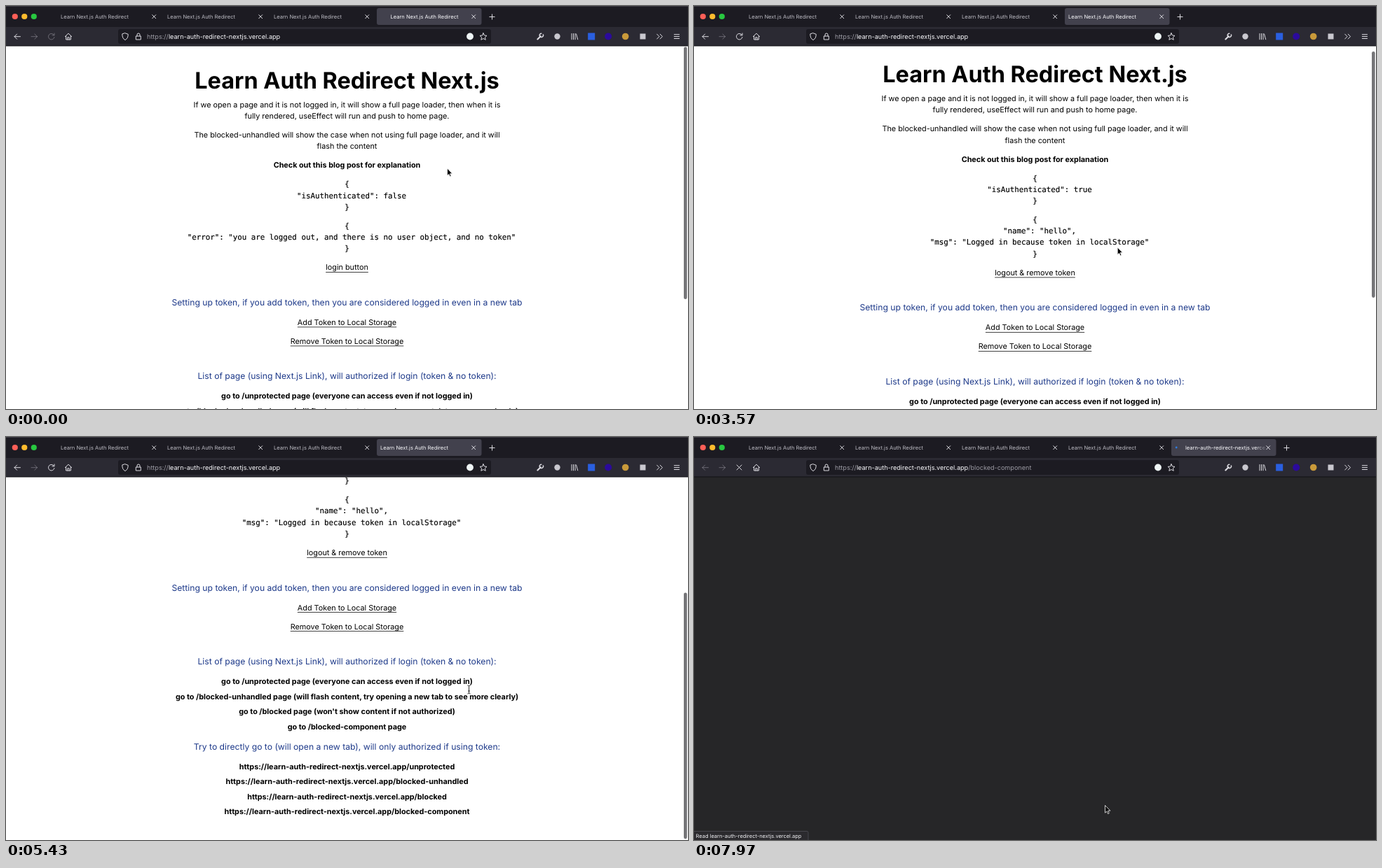
Write an HTML page that moves like this. It is 973 px wide and 576 px high and loops after 8 s.

```html
<!DOCTYPE html>
<html lang="en">
<head>
<meta charset="utf-8">
<title>Auth redirect demo</title>
<style>
  html, body { margin: 0; width: 100%; height: 100%; overflow: hidden; background: #fff; }
  svg { display: block; width: 973px; height: 576px; font-family: Inter, sans-serif; text-rendering: geometricPrecision; }
  text { white-space: pre; }
  .mid { text-anchor: middle; }
  .h1 { font-size: 48px; font-weight: 700; }
  .p, .link { font-size: 16px; }
  .b { font-size: 16px; font-weight: 700; }
  .h2 { font-size: 18px; fill: #1e3a8a; }
  .code { font: 16px "DejaVu Sans Mono", monospace; stroke: #000; stroke-width: .25; }
  .tab { font-size: 7.5px; fill: #bdbcc4; }
  .url { font-size: 9.1px; fill: #fbfbfe; }
  .status { font-size: 7.47px; fill: #f0f0f4; }
  .dim { fill: #9b9aa3; }
  .icon { fill: none; stroke: #dcdbe1; stroke-width: 1; stroke-linecap: round; stroke-linejoin: round; }
</style>
</head>
<body>
<svg id="stage" viewBox="0 0 973 576">
  <defs>
    <linearGradient id="fade" gradientUnits="userSpaceOnUse" x1="801" x2="818" y1="0" y2="0">
      <stop stop-color="#fbfbfe"/><stop offset="1" stop-color="#fbfbfe" stop-opacity="0"/>
    </linearGradient>
  </defs>
  <rect width="973" height="576" fill="#fff"/>
  <g id="page"></g>
  <rect id="thumb" x="967" width="4.6" rx="2.3" fill="#757578"/>
  <rect id="blank" y="57" width="973" height="519" fill="#262628"/>
  <g id="chrome">
    <rect width="973" height="30.5" fill="#1c1b22"/>
    <rect y="30" width="973" height="27" fill="#2b2a33"/>
    <rect y="56.5" width="973" height="1" fill="#111015"/>
    <rect width="973" height=".8" fill="#45444c"/>
    <circle cx="12.8" cy="15" r="4.1" fill="#ff5f57"/>
    <circle cx="26.3" cy="15" r="4.1" fill="#febc2e"/>
    <circle cx="39.8" cy="15" r="4.1" fill="#28c840"/>
    <rect id="active" y="3" width="149.5" height="24" rx="3" fill="#42414d"/>
    <g id="tabs"></g>
    <path id="plus" class="icon" d="M-3.6 15.5h7.2M0 11.9v7.2"/>
    <circle id="spinner" cy="15" r="1.4" fill="#2f7de0"/>
    <rect x="160" y="33" width="532" height="21" rx="3" fill="#1c1b22"/>
    <g class="icon">
      <path id="back" d="M20.5 43.7H12M15.6 40.1L12 43.7L15.6 47.3"/>
      <path opacity=".35" d="M36 43.7H44.5M40.9 40.1L44.5 43.7L40.9 47.3"/>
      <path id="reload" d="M68.3 41.2A4.3 4.3 0 1 0 69 44.6M69 39V41.9H66"/>
      <path id="stop" d="M61 40L68 47M68 40L61 47"/>
      <path d="M84.4 43.6L89 39.2L93.6 43.6M85.6 42.6V48H92.4V42.6M87.8 48V44.8H90.2V48"/>
      <path d="M170 38.8L174.2 40.3C174.3 44.6 172.7 47.1 170 48.6C167.3 47.1 165.7 44.6 165.8 40.3Z"/>
      <path d="M185.7 43H192.3V48H185.7ZM187 43V41A2 2 0 0 1 191 41V43"/>
      <path d="M681 38.7L682.5 42L686 42.4L683.4 44.8L684.2 48.3L681 46.5L677.8 48.3L678.6 44.8L676 42.4L679.5 42Z"/>
      <path d="M758.4 47.4L762.6 43.2" stroke-width="2.1"/>
      <path d="M766.4 41A2.7 2.7 0 1 1 763.8 39.2" stroke-width="1.5"/>
      <path d="M807 39.5V47.8M809.5 39.5V47.8M812 39.5V47.8M813.6 40L815.7 47.8"/>
      <path d="M928.7 40.2L932 43.6L928.7 47M933.2 40.2L936.5 43.6L933.2 47"/>
      <path d="M953.3 40.7H960.5M953.3 43.6H960.5M953.3 46.5H960.5"/>
    </g>
    <circle cx="662" cy="43.5" r="4.9" fill="#eef5f5"/>
    <circle cx="786.5" cy="43.5" r="4.2" fill="#c9c8cf"/>
    <rect x="830.2" y="38.5" width="10" height="10" fill="#2a5fe0"/>
    <circle cx="859.2" cy="43.5" r="5" fill="#2b0a9c"/>
    <circle cx="883.7" cy="43.5" r="4.8" fill="#c99a3a"/>
    <rect x="904.5" y="39.5" width="8" height="8" fill="#c9c8cf"/>
    <text class="url" x="201" y="47.1"><tspan class="dim">https://</tspan>learn-auth-redirect-nextjs.vercel.app<tspan id="path" class="dim"></tspan></text>
  </g>
  <g id="status">
    <rect x="-2" y="563.5" height="15" rx="2" fill="#1c1b22" stroke="#55545c" stroke-width=".7"/>
    <text class="status" x="2.6" y="572.7"></text>
  </g>
  <g id="cursor" stroke-linejoin="round">
    <path id="arrow" d="M0 0V10.6L2.4 8.4L4 12L5.7 11.3L4.1 7.7H7.4Z" fill="#000" stroke="#fff" stroke-width=".8"/>
    <path id="hand" d="M-1 1Q-1 0 0 0T1 1V4.4Q4.6 4 6 5.8V8.6L4.8 12H-1.2L-4.2 7.6Q-4 6.2-2.6 6.6L-1 8Z" fill="#000" stroke="#fff" stroke-width=".8"/>
    <path id="beam" d="M-2-6Q0-6 0-4.6Q0-6 2-6M0-4.6V4.8M-2 6Q0 6 0 4.6Q0 6 2 6M-1.3 2H1.3" fill="none" stroke="#111" stroke-width=".9"/>
  </g>
</svg>
<script>
// The page is laid out 1440 units wide and scaled down to the stage.
const LOOP = 8000, SCALE = 973 / 1440, TOP = 57.3, MID = 720, LINE = 24;
const AUTH = 1920, NEW_TAB = 6900;
const $ = id => document.getElementById(id);

function el(tag, attrs, parent, text) {
  const node = document.createElementNS('http://www.w3.org/2000/svg', tag);
  for (const k in attrs) node.setAttribute(k, attrs[k]);
  if (text) node.textContent = text;
  return parent.appendChild(node);
}
const show = (node, on) => node.setAttribute('display', on ? 'inline' : 'none');
const move = (node, x, y, scale = 1) => node.setAttribute('transform', `translate(${x} ${y}) scale(${scale})`);

const page = $('page');
const intro = el('g', {}, page), guest = el('g', {}, page), user = el('g', {}, page), rest = el('g', {}, page);

// Baseline of each style, measured from the top of its line box.
const BASE = { h1: 41.5, h2: 20.5, p: 17.8, b: 17.8, link: 17.8, code: 17.5 };

function write(parent, cls, top, str, dx = 0) {
  const y = top + BASE[cls];
  const t = el('text', { class: 'mid ' + cls, x: MID + dx, y }, parent, str);
  if (cls === 'link') {
    const w = t.getComputedTextLength();
    el('rect', { x: MID - w / 2, y: y + 4, width: w, height: 1.1 }, parent);
  }
}
const list = (parent, cls, top, step, lines) =>
  lines.forEach((s, i) => write(parent, cls, top + i * step, s));
// Indented code lines sit one character right of centre.
const code = (parent, top, lines) =>
  lines.forEach((s, i) => write(parent, 'code', top + i * LINE, s, s.length > 1 ? 9.6 : 0));

write(intro, 'h1', 48, 'Learn Auth Redirect Next.js');
list(intro, 'p', 112, LINE, [
  'If we open a page and it is not logged in, it will show a full page loader, then when it is',
  'fully rendered, useEffect will run and push to home page.'
]);
list(intro, 'p', 176, LINE, [
  'The blocked-unhandled will show the case when not using full page loader, and it will',
  'flash the content'
]);
write(intro, 'b', 240, 'Check out this blog post for explanation');

code(guest, 280, ['{', '"isAuthenticated": false', '}']);
code(guest, 368, ['{', '"error": "you are logged out, and there is no user object, and no token"', '}']);
write(guest, 'link', 456, 'login button');

code(user, 280, ['{', '"isAuthenticated": true', '}']);
code(user, 368, ['{', '"name": "hello",', '"msg": "Logged in because token in localStorage"', '}']);
write(user, 'link', 456 + LINE, 'logout & remove token');

write(rest, 'h2', 528, 'Setting up token, if you add token, then you are considered logged in even in a new tab');
list(rest, 'link', 572, 40, ['Add Token to Local Storage', 'Remove Token to Local Storage']);
write(rest, 'h2', 684, 'List of page (using Next.js Link), will authorized if login (token & no token):');
list(rest, 'b', 728, 32, [
  'go to /unprotected page (everyone can access even if not logged in)',
  'go to /blocked-unhandled page (will flash content, try opening a new tab to see more clearly)',
  "go to /blocked page (won't show content if not authorized)",
  'go to /blocked-component page'
]);
write(rest, 'h2', 864, 'Try to directly go to (will open a new tab), will only authorized if using token:');
const site = 'https://learn-auth-redirect-nextjs.vercel.app/';
list(rest, 'b', 908, 32, ['unprotected', 'blocked-unhandled', 'blocked', 'blocked-component'].map(s => site + s));
const focus = el('rect', {
  x: 614.5, y: 571, width: 211, height: 25, fill: 'none',
  stroke: '#333', 'stroke-dasharray': '1 1'
}, rest);

const titles = [0, 1, 2, 3, 4].map(i => {
  const x = 78 + 152 * i, g = el('g', {}, $('tabs'));
  const label = el('text', { class: 'tab', x, y: 18.2 }, g, i < 4 ? 'Learn Next.js Auth Redirect' : 'learn-auth-redirect-nextjs.verce');
  el('path', { class: 'icon', d: `M${x + 130.7} 12.7l5 5m0-5l-5 5` }, g);
  return { g, label };
});
titles[4].label.setAttribute('x', 701);

// Keys are [time, ...values], eased between neighbours.
function track(keys, t) {
  let i = 0;
  while (i < keys.length - 2 && t >= keys[i + 1][0]) i++;
  const [a, b] = [keys[i], keys[i + 1]];
  const u = Math.min(1, Math.max(0, (t - a[0]) / (b[0] - a[0])));
  const e = u * u * (3 - 2 * u);
  return a.slice(1).map((v, k) => v + (b[k + 1] - v) * e);
}
const cursorKeys = [
  [0, 629.5, 232], [300, 634, 240], [850, 658.5, 273], [960, 658.5, 273], [1600, 515, 442],
  [2000, 513, 442], [2430, 614.5, 331], [2900, 640, 326], [3600, 604, 345], [4300, 668, 318],
  [4800, 675.5, 313.5], [5350, 660.5, 361], [5520, 660.5, 361], [6150, 590, 514],
  [6330, 585, 529], [6700, 586.5, 531], [7200, 586.5, 526.5], [8000, 586.5, 526.5]
];
const scrollKeys = [[0, 0], [420, 0], [800, 8.8], [4830, 8.8], [5330, 224.5], [8000, 224.5]];
const statusKeys = [
  [6080, site + 'blocked', 195],
  [6370, site + 'blocked-component', 238],
  [NEW_TAB, 'Read learn-auth-redirect-nextjs.vercel.app', 165]
];

function draw(t) {
  const auth = t >= AUTH, opened = t >= NEW_TAB;
  const [scroll] = track(scrollKeys, t);
  move(page, 0, TOP - scroll, SCALE);
  move(rest, 0, auth ? LINE : 0);
  show(guest, !auth);
  show(user, auth);
  show(focus, t > 1850 && t < 3400);
  show($('blank'), opened);
  show($('thumb'), !opened);
  $('thumb').setAttribute('y', 58.5 + scroll * .73);
  $('thumb').setAttribute('height', auth ? 352 : 360.5);

  const on = opened ? 4 : 3;
  $('active').setAttribute('x', 529 + (on - 3) * 152);
  titles.forEach((tab, i) => tab.label.style.fill = i === 4 ? 'url(#fade)' : i === on ? '#fbfbfe' : '');
  titles[3].label.setAttribute('x', t < 300 ? 548.5 : 534);
  show(titles[4].g, opened);
  move($('plus'), opened ? 845.5 : 693.5, 0);
  show($('spinner'), opened);
  $('spinner').setAttribute('cx', 691 - 3.5 * Math.cos((t - 7870) / 160));

  $('back').setAttribute('opacity', opened ? .35 : 1);
  $('reload').setAttribute('opacity', t < 500 ? .35 : 1);
  show($('reload'), !opened);
  show($('stop'), opened);
  $('path').textContent = opened ? '/blocked-component' : '';

  const note = statusKeys.filter(k => t >= k[0]).pop();
  show($('status'), !!note);
  if (note) {
    const [box, label] = $('status').children;
    box.setAttribute('width', note[2]);
    box.setAttribute('fill', opened ? '#2b2a2e' : '#1c1b22');
    label.textContent = note[1];
  }

  const hand = (t > 1560 && t < 2080) || (t > 6400 && t < NEW_TAB);
  const beam = t > 5250 && t < 5650;
  move($('cursor'), ...track(cursorKeys, t));
  show($('hand'), hand);
  show($('beam'), beam);
  show($('arrow'), !hand && !beam);
}

const start = performance.now();
function tick() {
  draw((performance.now() - start) % LOOP);
  requestAnimationFrame(tick);
}
tick();
</script>
</body>
</html>
```
